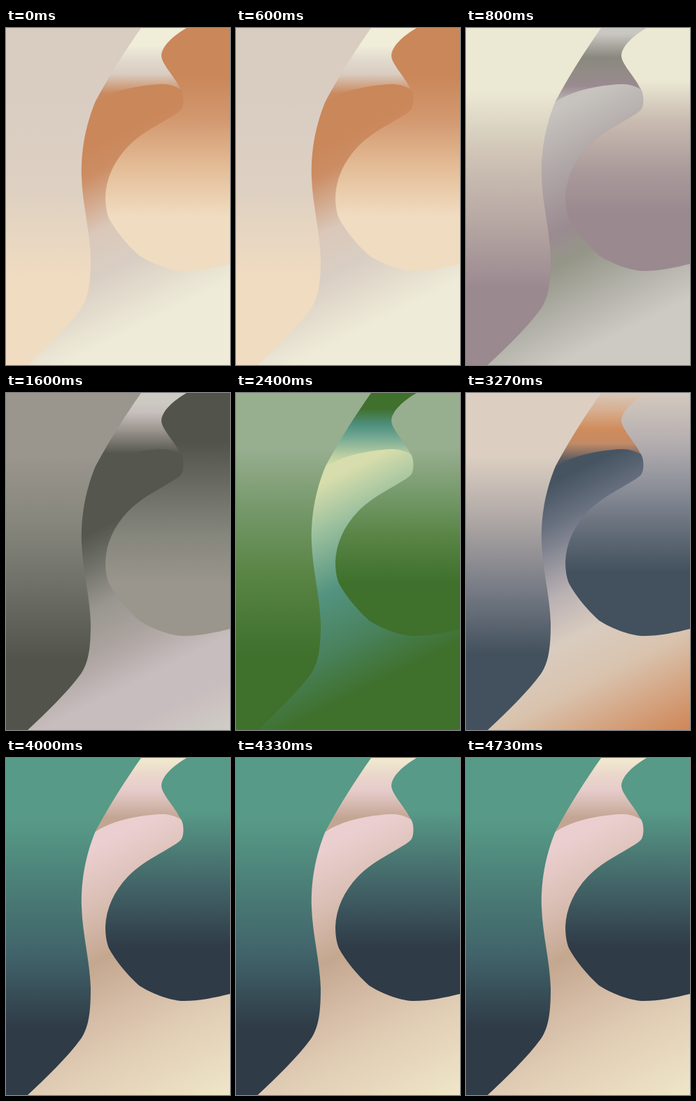
An HTML page for the animation above (4790 ms loop, 320 by 480 pixels).

```html
<!DOCTYPE html>
<html lang="en">
<head>
<meta charset="utf-8">
<title>Color study</title>
<style>
html, body { margin: 0; width: 100%; height: 100%; overflow: hidden; }
svg { display: block; width: 320px; height: 480px; }
</style>
</head>
<body>
<svg id="stage" viewBox="0 0 320 480"></svg>
<script>
const LOOP = 4790, HOLD = 800;

const shapes = {
  chest: 'M0 0H320V480H0Z',
  neck: 'M100 0H300V87H249C236 79 222 79 208 81C176 84 147 92 128 105L100 110Z',
  left: 'M0 0H193C171 31 148 67 128 104C112 142 107 180 108 212C109 250 120 290 121 328C121 358 119 383 107 400C87 427 58 455 31 480H0Z',
  right: 'M320 0H258C239 11 222 26 222 40C223 52 240 68 249 86C254 91 255 108 251 115C244 126 197 144 174 169C154 190 143 215 142 240C142 250 143 261 147 271C156 288 173 309 190 324C212 338 238 346 254 346C276 346 300 341 320 336Z'
};

// Each part: position, color, ... Straight gradients use y, the chest uses x / 2 + y.
const scenes = [
  {
    left: '110 d9cdc2 230 ded0c2 360 f0dcc0',
    right: '70 ca875a 130 d3986f 200 e4bd98 268 f0dcc0',
    neck: '25 f0edd8 45 e2dace 65 d9cdc2 93 ca8a60',
    chest: '230 ca875a 270 cc8d63 355 dac8ba 420 d9cec3 520 eeebd8'
  },
  {
    left: '90 ebe8d3 180 cfc4b6 280 b5a6a2 370 9b8990',
    right: '75 ebe8d3 130 cabcb1 200 ab9b9b 262 9b8990',
    neck: '8 c9c7c2 42 89887e 62 928b86 82 9a8a90 104 b9b3b2',
    chest: '180 c7c4bf 265 b0a7a7 355 9a8b91 405 959688 470 b0afa6 545 cccac3'
  },
  {
    left: '90 9a958d 180 87877d 280 6d6f66 380 52544c',
    right: '70 52544c 135 6b6d64 205 86877d 270 9a958d',
    neck: '12 cdcac3 28 c7bfbd 50 a09a93 86 55574e',
    chest: '260 55574e 310 71726a 370 999690 430 aaa29e 505 c8bdbe 565 c8bdbe 640 cfcdc5'
  },
  {
    left: '80 97ae8f 170 749768 260 588444 375 3f702c',
    right: '80 97ae8f 140 789b6d 205 588445 270 3f702c',
    neck: '22 3f702c 46 4f9080 65 78ab94 88 b9cda2 104 d5dcab',
    chest: '190 d7ddac 265 95bd9c 350 53937f 430 4a8360 515 3f702c'
  },
  {
    left: '90 dccfc2 190 a9a3a2 280 777b85 372 42515d',
    right: '0 d4c9be 70 b4aeb0 130 8e919a 200 626b78 255 42515d',
    neck: '0 d7c8ba 25 d7ae8e 52 d08b5b 72 c28a67 97 56595f',
    chest: '190 465462 250 697180 315 9b99a1 355 bab1b3 425 d9ccbf 500 d9c3ae 640 cf8656'
  },
  {
    left: '90 579a87 180 4b7f77 280 41636a 385 2f3b47',
    right: '75 579a87 140 4a7873 205 3e5960 270 2f3b47',
    neck: '4 efe8cf 22 ebd8cb 45 e6cccb 65 d6bab1 85 c3a593 104 c3a593',
    chest: '190 ebcfd0 270 dabfb5 355 c4a78f 430 d4bba5 500 e0ccb4 640 efe6c8'
  }
];

const axes = {
  flat: { x1: 0, y1: 0, x2: 0, y2: 480, from: 0, span: 480 },
  slant: { x1: 0, y1: 100, x2: 240, y2: 580, from: 100, span: 600 }
};
const stage = document.getElementById('stage');

function add(parent, tag, attrs) {
  const el = document.createElementNS('http://www.w3.org/2000/svg', tag);
  for (const key in attrs) el.setAttribute(key, attrs[key]);
  return parent.appendChild(el);
}

function addGradient(parent, id, text, axis) {
  const { x1, y1, x2, y2, from, span } = axis;
  const grad = add(parent, 'linearGradient', { id, x1, y1, x2, y2, gradientUnits: 'userSpaceOnUse' });
  const parts = text.split(' ');
  for (let i = 0; i < parts.length; i += 2) {
    add(grad, 'stop', { offset: (parts[i] - from) / span, 'stop-color': '#' + parts[i + 1] });
  }
}

const layers = scenes.map((scene, n) => {
  const group = add(stage, 'g', {});
  for (const name in shapes) {
    const id = name + n;
    addGradient(group, id, scene[name], name === 'chest' ? axes.slant : axes.flat);
    add(group, 'path', { d: shapes[name], fill: `url(#${id})` });
  }
  return group;
});

const start = performance.now();
function draw() {
  const t = (performance.now() - start) % LOOP;
  const current = Math.floor(t / HOLD);
  layers.forEach((layer, n) => layer.setAttribute('visibility', n === current ? 'visible' : 'hidden'));
  requestAnimationFrame(draw);
}
draw();
</script>
</body>
</html>
```
